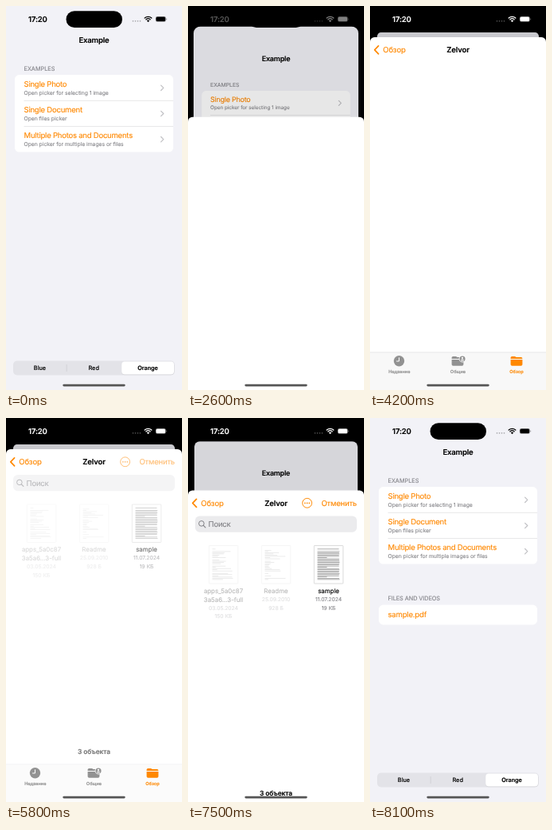
These frames come from a looping animation (221 by 480 pixels, 8.2 s). An HTML page:

```html
<!DOCTYPE html>
<html lang="en">
<head>
<meta charset="utf-8">
<title>Document picker</title>
<style>
html, body { margin: 0; width: 100%; height: 100%; overflow: hidden; background: #000; }
svg { display: block; width: 100%; height: 100%; }
text { font-family: Inter, "Open Sans", sans-serif; text-rendering: geometricPrecision; stroke-width: .14px; }
</style>
</head>
<body>
<svg id="stage" viewBox="0 0 221 480"></svg>
<script>
const LOOP = 8200, STEP = 100;
const W = 221, H = 480, SHEET_TOP = 39;
const ORANGE = '#ff8800', GREY = '#8a8a8e', TAB_GREY = '#929292';

// ---- drawing helpers (text is placed by the middle of its capitals) ----
const rect = (x, y, w, h, fill, r = 0, more = '') =>
  `<rect x="${x}" y="${y}" width="${w}" height="${h}" rx="${r}" fill="${fill}" ${more}/>`;
const disc = (x, y, r, fill, more = '') =>
  `<circle cx="${x}" cy="${y}" r="${r}" fill="${fill}" ${more}/>`;
const line = (d, color, width) =>
  `<path d="${d}" fill="none" stroke="${color}" stroke-width="${width}" stroke-linecap="round" stroke-linejoin="round"/>`;
const text = (s, x, y, size, fill, { anchor = 'start', weight = 400, gap = 0 } = {}) =>
  `<text x="${x}" y="${y + size * 0.36}" font-size="${size}" fill="${fill}" stroke="${fill}" ` +
  `text-anchor="${anchor}" font-weight="${weight}" letter-spacing="${gap}">${s}</text>`;
const mid = (s, x, y, size, fill, weight = 400, gap = 0) =>
  text(s, x, y, size, fill, { anchor: 'middle', weight, gap });
const group = (id, body, more = '') => `<g id="${id}" ${more}>${body}</g>`;

// ---- main screen ----
function listRow(title, note, i) {
  const y = 86 + i * 32.2;
  return (i ? rect(22.5, y - 0.25, 187.5, 0.5, '#d0d0d3') : '') +
    text(title, 22.5, y + 11.3, 9.56, ORANGE, { gap: -0.24 }) +
    text(note, 22.5, y + 22.3, 6.75, GREY) +
    line(`M194.6 ${y + 13.1}l3.2 3.2l-3.2 3.2`, '#c0c0c4', 1.2);
}

function mainScreen() {
  const rows = [
    ['Single Photo', 'Open picker for selecting 1 image'],
    ['Single Document', 'Open files picker'],
    ['Multiple Photos and Documents', 'Open picker for multiple images or files'],
  ];
  const picked = text('FILES AND VIDEOS', 22.5, 225, 7.3, '#85858b', { gap: -0.05 }) +
    rect(11, 233.5, 199, 25, '#fff', 5.6) +
    text('sample.pdf', 22.5, 246, 9.56, ORANGE, { gap: -0.2 });
  return rect(0, 0, W, H, '#f2f2f7') +
    mid('Example', 110.5, 43, 9.56, '#000', 600, -0.2) +
    text('EXAMPLES', 22.5, 78, 7.3, '#85858b') +
    rect(11, 86, 199, 96.6, '#fff', 5.6) +
    rows.map((r, i) => listRow(...r, i)).join('') +
    group('picked', picked) +
    rect(9, 443.5, 203, 18, '#e3e3e8', 5) +
    rect(75.8, 448, 0.6, 9, '#c9c9ce') +
    rect(145.2, 445.2, 66, 16, '#000', 4, 'opacity=".08"') +
    rect(145.2, 444.6, 65.8, 15.9, '#fff', 4) +
    mid('Blue', 42.5, 452.6, 7.3, '#000', 500) +
    mid('Red', 110.2, 452.6, 7.3, '#000', 500) +
    mid('Orange', 178, 452.6, 7.3, '#000', 600, -0.05) +
    rect(0, 0, W, H, '#000', 0, 'id="dim"');
}

// ---- status bar ----
function statusBar() {
  const dots = [0, 1, 2, 3].map(i => disc(159.5 + i * 3, 18.8, 0.85, 'currentColor', 'opacity=".3"')).join('');
  const wifi = '<path fill="currentColor" d="M178.5 20.2l-1.7-1.9a2.5 2.5 0 0 1 3.4 0z"/>' +
    line('M175.8 16.9a4 4 0 0 1 5.4 0M174.2 15a6.4 6.4 0 0 1 8.6 0', 'currentColor', 1.3);
  const battery = rect(187.9, 13, 12.8, 6.8, 'currentColor', 2.1, 'opacity=".5"') +
    rect(188.6, 13.7, 11.4, 5.4, 'currentColor', 1.5) +
    rect(201.3, 15.4, 0.8, 2, 'currentColor', 0.4, 'opacity=".45"');
  return group('clock', text('17:20', 28, 16.4, 9.56, 'currentColor', { weight: 600, gap: -0.15 })) +
    group('icons', dots + wifi + battery);
}

// ---- file sheet, drawn in its resting place ----
function page(x, seed, dense) {
  let s = seed, marks = '';
  const rand = () => (s = (s * 16807) % 2147483647) / 2147483647;
  for (let i = 0; i < 26; i++) {
    const width = dense ? (i % 8 < 7 ? 27 + rand() : 12) : 4 + rand() * 22;
    if (dense ? i !== 1 : rand() > 0.2)
      marks += rect(x + 4.2, 112 + i * 1.52, width, 0.7, dense ? '#8c8c8c' : '#999');
  }
  return rect(x, 108, 36.5, 47.5, '#fff', 0.6, 'stroke="#b8b8b8" stroke-width=".5"') + marks;
}

function file(x, names, notes, seed, off) {
  const labels = names.map((n, i) => mid(n, x, 164.3 + i * 11, 7.87, '#000')).join('') +
    notes.map((n, i) => mid(n, x, 164 + (names.length + i) * 10.8, 6.75, GREY)).join('');
  return `<g opacity="${off ? 0.27 : 1}">${page(x - 18.2, seed, !off)}${labels}</g>`;
}

function folder(x, color) {
  return `<path fill="${color}" d="M${x - 7.4} 441v-1.4q0-1.7 1.7-1.7h3.3q.8 0 1.4.6l.6.5h6.1q1.7 0 1.7 1.7v.3z` +
    `M${x - 7.4} 442h14.8v6q0 1.8-1.8 1.8h-11.2q-1.8 0-1.8-1.8z"/>`;
}

function tabs() {
  const recent = disc(36.5, 443.8, 6.7, TAB_GREY) + line('M36.5 439.8v4.2h-3', '#fff', 1);
  const badge = disc(116, 441, 4.4, '#fff') + disc(116, 441, 3.6, TAB_GREY) +
    disc(116, 440, 1.2, '#fff') + '<path d="M113.8 443.3a2.3 2.1 0 0 1 4.4 0z" fill="#fff"/>';
  return recent + folder(110, TAB_GREY) + badge + folder(184, ORANGE) +
    mid('Недавние', 36.8, 456.9, 5.6, TAB_GREY, 600, -0.05) +
    mid('Общие', 110.5, 456.9, 5.6, TAB_GREY, 600) +
    mid('Обзор', 184, 456.9, 5.6, ORANGE, 600);
}

function sheet() {
  const bar = line('M10.6 49.8l-4.8 5l4.8 5', ORANGE, 1.7) +
    text('Обзор', 16.3, 55, 9.56, ORANGE, { gap: -0.2 }) +
    mid('Zelvor', 110.5, 55, 9.56, '#000', 600, -0.15) + tabs();
  const more = disc(149.6, 54.8, 5.9, 'none', `stroke="${ORANGE}"`) +
    [-2.7, 0, 2.7].map(d => disc(149.6 + d, 54.8, 0.85, ORANGE)).join('');
  const search = rect(9, 71, 203, 20.2, '#ebebed', 5.6) +
    disc(16.9, 80.4, 3.3, 'none', 'stroke="#808085"') +
    line('M19.4 82.9l2.5 2.5', '#808085', 1.1) +
    text('Поиск', 25.5, 81.2, 9.56, '#808085', { gap: -0.2 });
  const files = file(44.5, ['apps_5a0c87', '3a5a6…3-full'], ['03.05.2024', '150 КБ'], 11, true) +
    file(110.5, ['Readme'], ['25.09.2010', '928 Б'], 77, true) +
    file(176.5, ['sample'], ['11.07.2024', '19 КБ'], 5, false);
  const content = more + text('Отменить', 212, 55, 9.56, ORANGE, { anchor: 'end', gap: -0.18 }) +
    search + files + mid('3 объекта', 110.5, 417, 8.4, '#000', 600, -0.1);
  return rect(0, SHEET_TOP, W, H, '#fff', 5.6) +
    group('tabBack', rect(0, 433, W, 47, '#f8f8f8') + rect(0, 432.7, W, 0.5, '#d2d2d4')) +
    group('bar', bar) + group('content', content);
}

document.getElementById('stage').innerHTML =
  `<clipPath id="round">${rect(0, 0, W, H + 40, '#000', 0, 'id="corner"')}</clipPath>` +
  rect(0, 0, W, H, '#000') +
  group('card', mainScreen(), 'clip-path="url(#round)"') +
  rect(75.5, 6.3, 70.5, 20.7, '#000', 10.35) +
  statusBar() + group('sheet', sheet()) +
  rect(71.3, 472.7, 78.4, 2.7, '#555', 1.35);

// ---- motion ----
const el = {};
document.querySelectorAll('[id]').forEach(e => el[e.id] = e);
const set = (id, name, value) => el[id].setAttribute(name, value);
const ramp = (t, a, b) => Math.min(1, Math.max(0, (t - a) / (b - a)));

// critically damped spring from 0 to 1
function spring(ms) {
  if (ms <= 0) return 0;
  if (ms > 600) return 1;
  const x = ms / 1000 * 18.26;
  return 1 - (1 + x) * Math.exp(-x);
}

function tint(id, level) {
  const v = Math.round(255 * level);
  set(id, 'color', `rgb(${v},${v},${v})`);
}

function draw(t) {
  const p = spring(t - 2445) - spring(t - 7468);
  set('card', 'transform', `translate(${9 * p} ${33 * p}) scale(${1 - 18 * p / W})`);
  set('corner', 'rx', p > 0.005 ? 22 - 16.5 * p : 0);
  set('dim', 'opacity', 0.11 * p + 0.06 * p ** 8);
  set('sheet', 'transform', `translate(0 ${(H - SHEET_TOP) * (1 - p)})`);
  set('sheet', 'visibility', p > 0 ? 'visible' : 'hidden');

  tint('clock', ramp(t, 2520, 2760) - ramp(t, 7560, 7735));
  tint('icons', ramp(t, 2500, 2700) - ramp(t, 7500, 7605));

  const loaded = ramp(t, 5740, 5850);
  set('bar', 'opacity', t >= 4200 ? 1 : 0);
  set('content', 'opacity', loaded);
  set('tabBack', 'opacity', t >= 4200 ? 1 - loaded : 0);
  set('picked', 'opacity', t >= 8100 ? 1 : 0);
}

const start = performance.now();
function tick() {
  const t = (performance.now() - start) % LOOP;
  draw(Math.floor(t / STEP) * STEP);
  requestAnimationFrame(tick);
}
tick();
</script>
</body>
</html>
```
